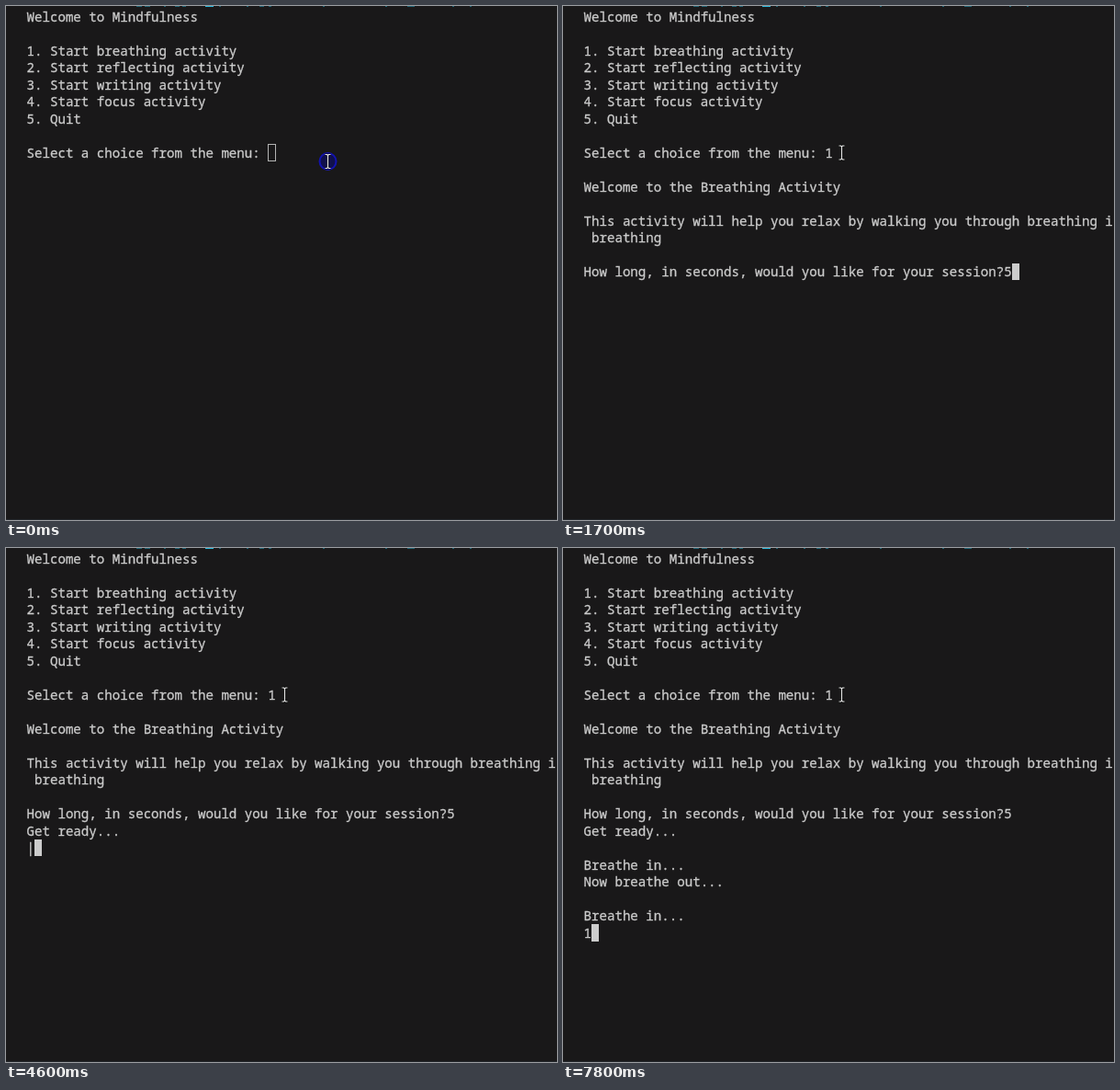
Animation of 600x559 px, one loop 8 s. Source, as an HTML page:

```html
<!DOCTYPE html>
<html lang="en">
<head>
<meta charset="utf-8">
<title>Breathing activity</title>
<style>
  html, body { margin: 0; width: 100%; height: 100%; overflow: hidden; background: #191819; }
  #stage { position: relative; width: 600px; height: 559px; overflow: hidden; background: #191819; }
  #text {
    position: absolute; left: 22.5px; top: 2.5px; margin: 0;
    font: 14.13px/18.5px "Noto Sans Mono", "DejaVu Sans Mono", monospace;
    color: #ccc; -webkit-text-stroke: 0.3px #ccc; white-space: pre;
  }
  #cursor { position: absolute; width: 8.5px; height: 18.5px; box-sizing: border-box; background: #ccc; }
  #cursor.hollow { background: none; border: 1px solid #b4b4b4; }
  svg { position: absolute; left: 0; top: 0; }
</style>
</head>
<body>
<div id="stage">
  <pre id="text"></pre>
  <div id="cursor"></div>
  <svg width="600" height="559" fill="none">
    <!-- tails of the line scrolled off the top -->
    <g stroke="#2391ad">
      <path d="M142 .5h6m3 0h6m15 0h2m10 0h5m3 0h4m36 0h2m28 0h2m12 0h5m5 0h3m56 0h2m66 0h2m22 0h8m41 0h2m17 0h2" opacity=".6"/>
      <path d="M217 .5h9" stroke="#29b8db"/>
    </g>
    <path d="M0 558.5h600" stroke="#202428"/>
    <g id="pointer">
      <circle id="ring" r="9" fill="#10104c" stroke="#1212b0" stroke-width="2"/>
      <path d="M-3 -7.5h2l1 1l1 -1h2M0 -6.5v13M-3 7.5h2l1 -1l1 1h2" stroke="#000" stroke-width="3" opacity=".5"/>
      <path d="M-3 -7.5h2l1 1l1 -1h2M0 -6.5v13M-3 7.5h2l1 -1l1 1h2" stroke="#e4e4e4" stroke-width="1.2"/>
    </g>
  </svg>
</div>
<script>
const LOOP = 8000, COL = 8.48, ROW = 18.5, LEFT = 22.5, TOP = 2.5;
const byId = id => document.getElementById(id);
const text = byId("text"), cursor = byId("cursor"), pointer = byId("pointer"), ring = byId("ring");

const menu = `Welcome to Mindfulness

1. Start breathing activity
2. Start reflecting activity
3. Start writing activity
4. Start focus activity
5. Quit

Select a choice from the menu: `;
const intro = `

Welcome to the Breathing Activity

This activity will help you relax by walking you through breathing i
 breathing

How long, in seconds, would you like for your session?`;

// Spinner changes; the blank is the moment between erase and redraw.
const spins = [[2100, "|"], [2500, "/"], [2900, "-"], [3300, "|"], [3700, "/"],
  [4100, ""], [4200, "-"], [4600, "|"], [5000, "/"], [5400, "-"]];

// Terminal output at time t; the cursor sits at its end.
function output(t) {
  let out = menu;
  if (t >= 600) out += "1";
  if (t >= 900) out += intro;
  if (t >= 1700) out += "5";
  if (t >= 2000) out += "\nGet ready...\n";
  if (t < 5800) {
    const spin = spins.filter(([at]) => t >= at).pop();
    return spin ? out + spin[1] : out;
  }
  out += "\nBreathe in...\n";
  if (t >= 6800) out += "Now breathe out...\n";
  if (t >= 7800) out += "\nBreathe in...\n";
  return out + "1";
}

// Pointer arcs upward, then settles beside the typed choice.
function pointerAt(t) {
  const p = Math.min(t / 800, 1), q = 1 - p;
  const x = 350.5 * q + 304.5 * p - (t >= 900 ? 1 : 0);
  const y = 169 * q + 159.5 * p - 48 * Math.sin(Math.PI * p);
  return [x, y];
}

function draw(t) {
  const out = output(t), lines = out.split("\n");
  if (text.textContent !== out) text.textContent = out;
  cursor.style.left = LEFT + lines[lines.length - 1].length * COL + "px";
  cursor.style.top = TOP + (lines.length - 1) * ROW - 0.25 + "px";
  cursor.className = t < 100 ? "hollow" : "";
  pointer.setAttribute("transform", `translate(${pointerAt(t)})`);
  ring.style.opacity = t < 200 ? 1 : 0;
}

const start = performance.now();
function tick() {
  const t = (performance.now() - start) % LOOP;
  draw(Math.floor(t / 100) * 100);
  requestAnimationFrame(tick);
}
tick();
</script>
</body>
</html>
```
